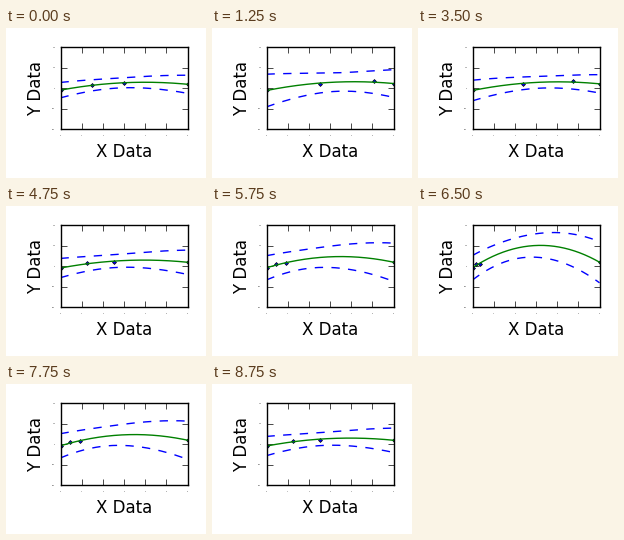
Write a matplotlib script that moves like this. It is 200 px wide and 150 px high and loops after 9 s.

```python
import numpy as np
import matplotlib.pyplot as plt
from matplotlib.animation import FuncAnimation

W, H, DPI = 200, 150, 100
FRAMES, INTERVAL = 36, 250
X_MAX, Y_MAX = 6.0, 40.0
T_95 = 12.706  # Student t, one degree of freedom
NOISE = np.array([-2.0, 2.0, 2.0, -2.0])

plt.rcParams.update({
    "font.family": "DejaVu Sans",
    "axes.linewidth": 1.0,
    "lines.linewidth": 1.0,
    "lines.scale_dashes": False,
})


def sample(frame):
    """Four noisy points on a line; the inner two slide back and forth."""
    x1 = 1.5 * (1 + 0.9 * np.sin(2 * np.pi * frame / FRAMES))
    x = np.array([0.0, x1, 2 * x1, X_MAX])
    return x, x + NOISE


def fit_with_band(x, y, grid):
    """Quadratic fit and the half width of its confidence band."""
    coef = np.polyfit(x, y, 2)
    s = np.sqrt(np.sum((y - np.polyval(coef, x)) ** 2))
    dx = x - x.mean()
    half = T_95 * s * np.sqrt(1 / len(x) + (grid - x.mean()) ** 2 / (dx @ dx))
    return np.polyval(coef, grid), half


fig = plt.figure(figsize=(W / DPI, H / DPI), dpi=DPI, facecolor="white")
ax = fig.add_axes([54.5 / W, 48.7 / H, 127 / W, 82 / H])
ax.set_xlim(0, X_MAX)
ax.set_ylim(-Y_MAX, Y_MAX)
ax.set_xticks(np.arange(0, X_MAX + 1))
ax.set_yticks(np.arange(-Y_MAX, Y_MAX + 1, 20))
ax.tick_params(direction="in", length=4, width=0.5, pad=4, labelsize=1,
               top=True, right=True)
ax.set_xlabel("X Data", fontsize=12, labelpad=5)
ax.set_ylabel("Y Data", fontsize=12, labelpad=5)

grid = np.linspace(0, X_MAX, 200)
points, = ax.plot([], [], "D", color="blue", markersize=2,
                  markeredgecolor="black", markeredgewidth=0.5)
curve, = ax.plot([], [], color="green")
upper, = ax.plot([], [], color="blue", dashes=(6, 6))
lower, = ax.plot([], [], color="blue", dashes=(6, 6))


def update(frame):
    x, y = sample(frame)
    fit, half = fit_with_band(x, y, grid)
    points.set_data(x, y)
    curve.set_data(grid, fit)
    upper.set_data(grid, fit + half)
    lower.set_data(grid, fit - half)
    return points, curve, upper, lower


anim = FuncAnimation(fig, update, frames=FRAMES, interval=INTERVAL,
                     repeat=True, repeat_delay=0)
plt.show()
```
